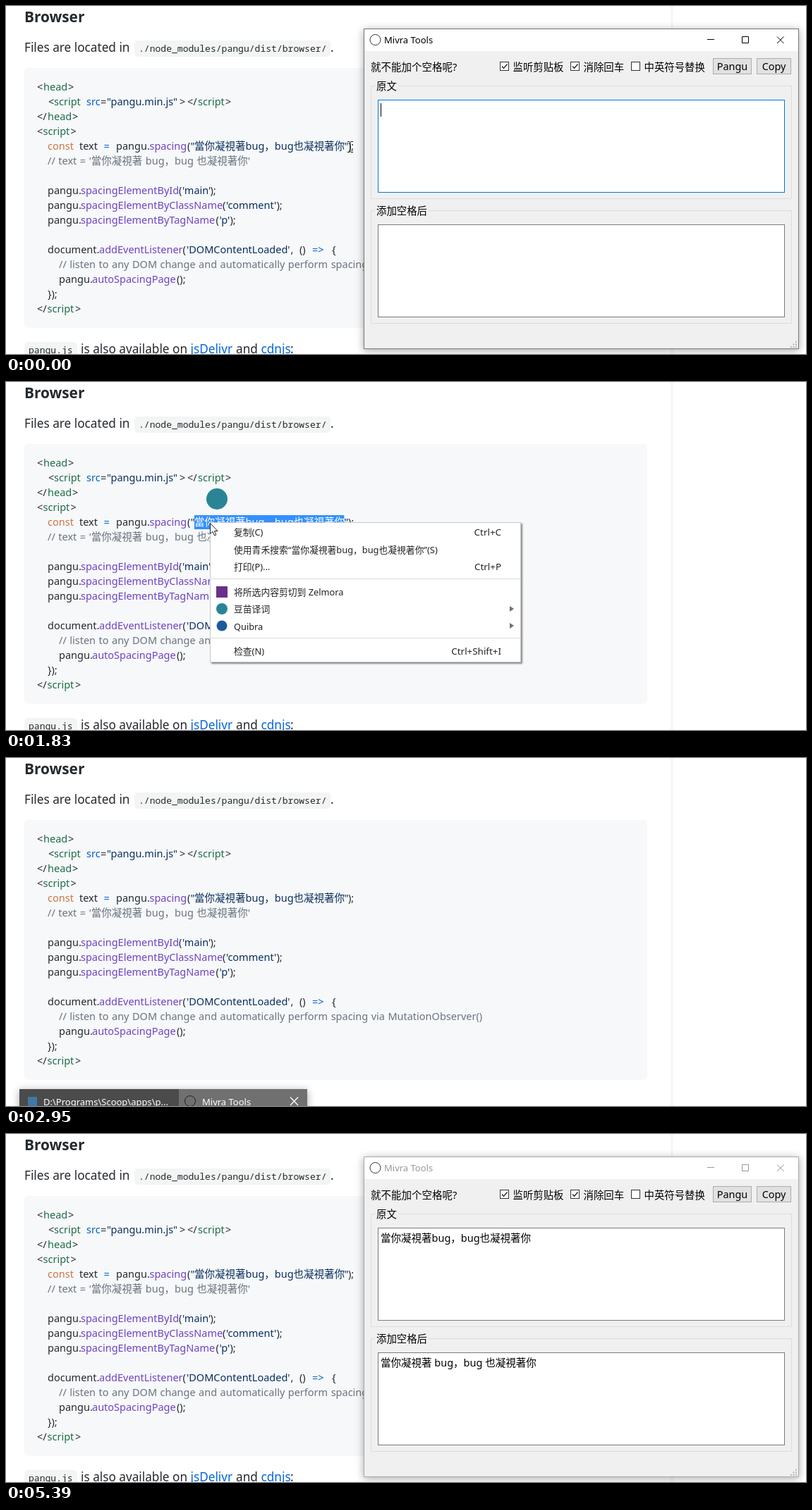
Write an HTML page that moves like this. It is 1134 by 494 pixels and loops after 5.47 s.

```html
<!DOCTYPE html>
<html lang="zh">
<head>
<meta charset="utf-8">
<style>
html, body { margin: 0; height: 100%; overflow: hidden; background: #fff }
svg { display: block; width: 1134px; height: 494px }
text { font-family: "Noto Sans", "Noto Sans CJK SC", "Noto Sans CJK TC", "Noto Sans CJK JP", sans-serif; white-space: pre }
.mono { font-family: "Noto Sans Mono", monospace }
.code { word-spacing: .7px }
.win { filter: drop-shadow(0 2px 6px rgba(0,0,0,.35)) }
.pop { filter: drop-shadow(2px 2px 1px rgba(0,0,0,.45)) }
</style>
</head>
<body>
<svg id="stage" viewBox="0 0 1134 494"></svg>
<script>
const LOOP = 5470;
const RAW = '當你凝視著bug，bug也凝視著你';
const SPACED = '當你凝視著 bug，bug 也凝視著你';
const APP = 'Mivra Tools';
const $ = id => document.getElementById(id);
const esc = s => s.replace(/&/g, '&amp;').replace(/</g, '&lt;');
const text = (x, y, size, fill, s, extra = '') =>
  `<text x="${x}" y="${y}" font-size="${size}" fill="${fill}" ${extra}>${esc(s)}</text>`;
const rect = (x, y, w, h, fill, extra = '') =>
  `<rect x="${x}" y="${y}" width="${w}" height="${h}" fill="${fill}" ${extra}/>`;
// one-pixel outline, given by its outer edges
const box = (x, y, x2, y2, fill, stroke, extra = '') =>
  rect(x + .5, y + .5, x2 - x - 1, y2 - y - 1, fill, `stroke="${stroke}" ${extra}`);
const path = (d, stroke, extra = '') => `<path d="${d}" fill="none" stroke="${stroke}" ${extra}/>`;
const dot = (x, y, r, fill, extra = '') => `<circle cx="${x}" cy="${y}" r="${r}" fill="${fill}" ${extra}/>`;
const group = (id, body, extra = '') => `<g id="${id}" ${extra}>${body}</g>`;

// Each line: tokens of "x colour text", separated by ¦
const INK = { k: '#24292e', g: '#1f6b45', b: '#005cc5', n: '#0b2f5c', o: '#cc7448', p: '#6f42c1', c: '#6a737d' };
const CODE = [
  '44 k <¦53 g head¦88 k >',
  '60 k <¦68 g script¦114 b src¦134 k =¦143 n "pangu.min.js"¦246 k >¦257 k </¦272 g script¦311 k >',
  '44 k </¦59 g head¦94 k >',
  '44 k <¦52.5 g script¦91.5 k >',
  `59 o const¦104 k text¦138.5 b =¦156 k pangu.¦203.5 p spacing¦257 k (¦261.5 n "¦267 n ${RAW}¦479.5 n "¦485 k );`,
  `59 c // text = '${SPACED}'`,
  '',
  "59 k pangu.¦106 p spacingElementById¦245 k (¦250 n 'main'¦289.5 k );",
  "59 k pangu.¦106 p spacingElementByClassName¦307 k (¦312 n 'comment'¦383.5 k );",
  "59 k pangu.¦106 p spacingElementByTagName¦297.5 k (¦302.5 n 'p'¦317.5 k );",
  '',
  "59 k document.¦132 p addEventListener¦250.5 k (¦256 n 'DOMContentLoaded'¦403.5 k ,¦416 k ()¦434 b =>¦462 k {",
  '75 c // listen to any DOM change and automatically perform spacing via MutationObserver()',
  '75 k pangu.¦122 p autoSpacingPage¦242 k ();',
  '59 k });',
  '44 k </¦58.5 g script¦98 k >'
];
const code = CODE.map((line, i) => line && line.split('¦').map(tok => {
  const [, x, ink, s] = tok.match(/^(\S+) (\S) (.*)$/);
  return text(x, 120 + 21 * i, 14.5, INK[ink], s, 'class="code"');
}).join('')).join('');

const page = rect(943.5, 0, 1, 494, '#e6e8eb')
  + text(26, 23, 20.8, '#24292e', 'Browser', 'font-weight="700"')
  + text(26, 64.5, 17.2, '#24292e', 'Files are located in')
  + rect(182, 49, 278, 23, '#f3f4f4', 'rx="5"')
  + text(188, 65, 13.07, '#24292e', './node_modules/pangu/dist/browser/', 'class="mono"')
  + text(460, 64.5, 17.2, '#24292e', '.')
  + rect(26, 88, 883, 369, '#f6f8fa', 'rx="5"') + code
  + rect(26, 477, 75, 23, '#f3f4f4', 'rx="5"')
  + text(32, 493, 13.07, '#24292e', 'pangu.js', 'class="mono"')
  + text(106, 493, 17.2, '#24292e', 'is also available on')
  + text(261.5, 493, 17.2, '#0366d6', 'jsDelivr') + text(326, 493, 17.2, '#24292e', 'and')
  + text(361.5, 493, 17.2, '#0366d6', 'cdnjs') + text(403, 493, 17.2, '#24292e', ':');

// Text selection: blue box and white text behind a moving clip
const selection = (id, x, y, w, h, fill, base, s) =>
  `<clipPath id="${id}Clip">${rect(x, y, w, h, '#000', `id="${id}Rect"`)}</clipPath>`
  + group(id, rect(x, y, w, h, fill) + text(x, base, 14.5, '#fff', s), `clip-path="url(#${id}Clip)"`);

const check = (x, label, on) => box(x, 79, x + 13, 92, '#fff', '#333')
  + (on ? path(`M${x + 3} 85.5l2.5 3l5 -6`, '#222', 'stroke-width="1.3"') : '')
  + text(x + 18.5, 91.5, 14.4, '#000', label);
const button = (x, x2, s) => box(x, 74, x2, 97, '#e1e1e1', '#adadad')
  + text((x + x2) / 2, 91, 14.4, '#000', s, 'text-anchor="middle"');
const field = (id, y, label, w) => box(517, y, 1114, y + 161, 'none', '#dcdcdc')
  + rect(523, y - 2, w, 5, '#f0f0f0') + text(525, y + 6, 14.4, '#000', label)
  + box(527, y + 20, 1104, y + 152, '#fff', '#7a7a7a', `id="${id}"`);
let grip = '';
for (let i = 0; i < 3; i++) for (let j = 0; j <= i; j++) grip += rect(1119 - 3.5 * j, 476 + 3.5 * i, 2, 2, '#b8b8b8');

const win = rect(507, 32, 617, 455, '#f0f0f0', 'class="win"')
  + rect(508, 33, 615, 31, '#fff') + box(507, 32, 1124, 487, 'none', '#777', 'id="frame"')
  + dot(523.5, 48, 7.5, '#fff', 'stroke="#333"')
  + group('caption', text(536, 53, 13, '#000', APP)
    + path('M994 47.5h10M1043.5 43.5h9v9h-9zM1093 43.5l9.5 9.5M1102.5 43.5l-9.5 9.5', '#000'))
  + text(517, 91.5, 14.5, '#000', '就不能加个空格呢?')
  + check(700, '监听剪贴板', 1) + check(800, '消除回车', 1) + check(886, '中英符号替换', 0)
  + button(1002, 1057, 'Pangu') + button(1064, 1113, 'Copy')
  + field('input', 113, '原文', 33) + field('output', 290, '添加空格后', 76)
  + group('filled', text(531, 152.5, 14.5, '#000', RAW) + text(531, 329.5, 14.5, '#000', SPACED))
  + selection('outSel', 531, 314, 221, 20, '#0078d7', 329.5, SPACED)
  + rect(531, 138, 1, 19, '#000', 'id="caret"') + grip;

const item = (y, s, key = '') => text(323, y, 12.8, '#222', s)
  + text(702, y, 13.4, '#222', key, 'text-anchor="end"');
const more = y => `<path d="M714 ${y - 4}l6 4l-6 4z" fill="#7a6a72"/>`;
const menu = rect(289, 199, 441, 199, '#fff', 'class="pop"') + box(289, 199, 730, 398, '#fff', '#c8c8c8')
  + rect(290, 201, 439, 24, '#c6c6c6', 'id="hover"')
  + item(218, '复制(C)', 'Ctrl+C') + item(243, `使用青禾搜索“${RAW}”(S)`) + item(267, '打印(P)...', 'Ctrl+P')
  + rect(290, 279, 439, 1, '#dcdcdc')
  + item(302.5, '将所选内容剪切到 Zelmora') + item(327, '豆苗译词') + item(351.5, 'Quibra')
  + rect(298, 290, 16, 16, '#6a2f8a') + dot(306, 322, 8, '#2a8494') + dot(306, 346, 7.5, '#1c5a9c')
  + more(322) + more(346)
  + rect(290, 363, 439, 1, '#dcdcdc') + item(387, '检查(N)', 'Ctrl+Shift+I');

const preview = rect(19, 470, 408, 30, '#4b4b4b', 'class="win"') + rect(245, 470, 182, 30, '#707070')
  + rect(31, 481, 13, 13, '#3f78a8') + text(53, 492.5, 13, '#fff', 'D:\\Programs\\Scoop\\apps\\p...')
  + dot(261, 487, 7.5, '#707070', 'stroke="#222"') + text(278, 492.5, 13, '#fff', APP)
  + path('M403 481.5l11 11.5M414 481.5l-11 11.5', '#fff', 'stroke-width="1.3"');

const cursor = dot(0, 0, 12.5, '#e8d818', 'id="press" opacity=".7"')
  + path('M-4 -7.5h3l1 1l1 -1h3M0 -6.5v13M-4 7.5h3l1 -1l1 1h3', '#111', 'id="beam"')
  + '<path id="arrow" d="M.5 .5v15l3.5 -3.2l2.6 5.7l2.3 -1l-2.5 -5.5h4.6z" fill="#fff" stroke="#222"/>';

$('stage').innerHTML = page
  + selection('codeSel', 267, 189, 212.5, 20, '#3390ff', 204, RAW)
  + dot(299, 166, 15, '#2a8494', 'id="badge"')
  + group('menu', menu) + group('win', win) + group('preview', preview) + group('cursor', cursor);

// Pointer path: time, x, y
const WAY = [[0, 488, 200], [160, 488, 200], [310, 479, 200], [470, 479, 200], [950, 327, 200], [1270, 269, 199],
  [1430, 269, 199], [1670, 289, 200], [1990, 289, 200], [2230, 346, 212], [2470, 346, 212], [2790, 345, 520],
  [3030, 390, 520], [3110, 527, 369], [3350, 868, 332], [3590, 805, 319], [3670, 805, 319], [3750, 757, 324],
  [3990, 483, 325], [4150, 761, 343], [4600, 761, 343], [4790, 899, 446], [LOOP, 899, 446]];
function pointer(t) {
  const i = Math.max(1, WAY.findIndex(k => k[0] > t));
  const [a, b] = [WAY[i - 1], WAY[i]];
  const f = Math.max(0, (t - a[0]) / (b[0] - a[0]));
  return [a[1] + (b[1] - a[1]) * f, a[2] + (b[2] - a[2]) * f];
}

// Select whole characters leftwards from the right edge to x
function select(id, s, right, x) {
  let left = right;
  for (const ch of [...s].reverse()) {
    const w = ch === ' ' ? 4 : ch < '~' ? 8.9 : 14.5;
    if (left - w / 2 < x) break;
    left -= w;
  }
  $(id + 'Rect').setAttribute('x', left);
  $(id + 'Rect').setAttribute('width', right + .5 - left);
}

const show = (id, on) => $(id).setAttribute('visibility', on ? 'inherit' : 'hidden');

function draw() {
  const t = performance.now() % LOOP;
  const within = (a, b) => t >= a && t < b;
  // The pointer is sampled about every 80 ms
  const tick = Math.floor((t + 10) / 80) * 80 - 10;
  const [x, y] = pointer(tick);

  show('win', !within(480, 3030));
  show('filled', t >= 3030);
  show('badge', within(1500, 2470));
  show('menu', within(1750, 2410));
  show('hover', within(2070, 2410));
  show('preview', within(2790, 3030));

  show('codeSel', within(480, 2630));
  select('codeSel', RAW, 479, t < 1270 ? x : 267);
  show('outSel', within(3750, 4290));
  select('outSel', SPACED, 752, tick < 3990 ? x : 531);

  const late = t >= 3750, active = t < 5390;
  $('input').setAttribute('stroke', late ? '#7a7a7a' : '#0078d7');
  $('output').setAttribute('stroke', late && active ? '#0078d7' : '#7a7a7a');
  $('frame').setAttribute('stroke', active ? '#777' : '#aaa');
  $('caption').setAttribute('opacity', active ? 1 : .4);
  $('caret').setAttribute('x', late ? 752 : 531);
  $('caret').setAttribute('y', late ? 315 : 138);
  show('caret', t < 480 || within(3030, 3510) || within(4290, 4760));

  const arrow = within(1750, 3050) || t >= 4760;
  $('cursor').setAttribute('transform', `translate(${Math.round(x)} ${Math.round(y)})`);
  show('cursor', active);
  show('arrow', arrow && active);
  show('beam', !arrow && active);
  show('press', within(480, 1420) || within(1670, 1830) || within(2310, 2410) || within(3750, 4070) || within(4290, 4450));
  requestAnimationFrame(draw);
}
draw();
</script>
</body>
</html>
```
